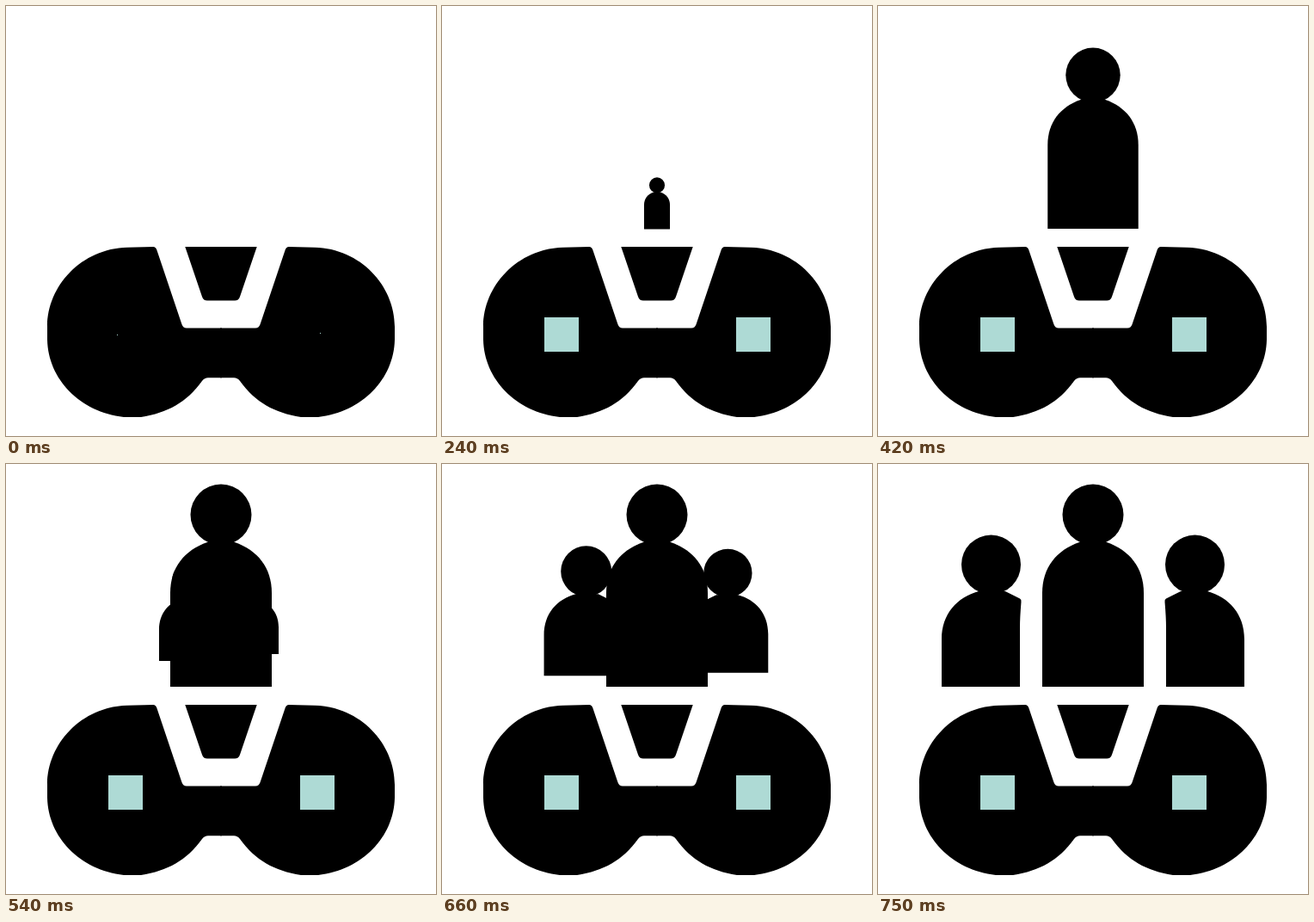
Animation, 500 px wide and 500 px high, one loop 1.18 s. Source, as an HTML page:

```html
<!DOCTYPE html>
<html lang="en">
<head>
<meta charset="utf-8">
<title>Group and binoculars</title>
<style>
html, body { margin: 0; height: 100%; overflow: hidden; background: #fff; }
svg { display: block; width: 100vw; height: 100vh; }
rect { fill: #aedad5; shape-rendering: crispEdges; }
</style>
</head>
<body>
<svg viewBox="0 0 500 500">
  <defs>
    <g id="side">
      <circle cx="57.5" cy="-142" r="34.5"/>
      <path d="M0 0V-55C0 -85 18 -104 43 -111H74L91 -102.5Q93 -101.5 92.5 -98.5Q91 -80 91 -69V0Z"/>
    </g>
  </defs>
  <path id="half" d="M251 374.5H210Q206 374.5 204.4 370L175.8 285Q174.500 280 171 280L141 280.700C88 282 48 325 48 373V388C49 434 86 472 137 478H157C188 473 210 461 228 436Q231 432.300 235 432.300H251Z"/>
  <use href="#half" transform="translate(500) scale(-1 1)"/>
  <path d="M208.300 280H291.700L272 338Q270.500 342.500 266 342.500H234Q229.500 342.500 228 338Z"/>
  <rect id="lensL" width="1" height="1"/>
  <rect id="lensR" width="1" height="1"/>
  <g id="leader">
    <circle cy="-200" r="35.5"/>
    <path d="M-59 0V-109C-59 -139 -42 -159 -16 -168H16C42 -159 59 -139 59 -109V0Z"/>
  </g>
  <use id="left" href="#side"/>
  <use id="right" href="#side"/>
</svg>
<script>
const LOOP = 1180, STEP = 30;

const lerp = (a, b, p) => a + (b - a) * p;

// Progress from 0 to 1, negative before the start.
const phase = (t, start, end) => Math.min(1, (t - start) / (end - start));

function place(id, p, x, y, size, flip = 1) {
  const el = document.getElementById(id);
  el.setAttribute("visibility", p < 0 ? "hidden" : "visible");
  el.setAttribute("transform", `translate(${x} ${y}) scale(${size * flip} ${size})`);
}

function draw(now) {
  const t = Math.floor(now % LOOP / STEP) * STEP;

  const lens = phase(t, 0, 180), size = lerp(1, 40, lens);
  place("lensL", lens, lerp(129, 119, lens), lerp(382, 362, lens), size);
  place("lensR", lens, lerp(365, 342, lens), lerp(380, 362, lens), size);

  const rise = phase(t, 180, 450);
  place("leader", rise, 250, lerp(259.5, 259, rise), lerp(0.042, 1, rise));

  const part = phase(t, 540, 750);
  place("left", part, lerp(178, 74, part), lerp(229, 259, part), lerp(0.66, 1, part));
  place("right", part, lerp(317, 426, part), lerp(221, 259, part), lerp(0.57, 1, part), -1);
}

function tick() {
  draw(performance.now());
  requestAnimationFrame(tick);
}
tick();
</script>
</body>
</html>
```
